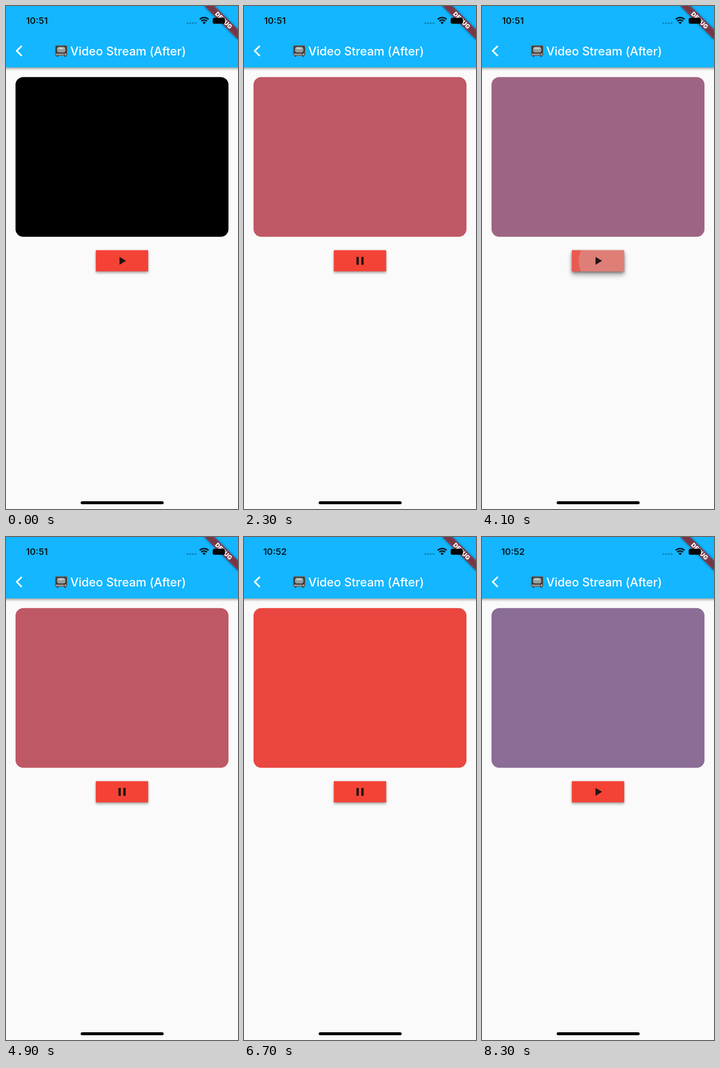
These frames come from a looping animation (390 px wide and 844 px high, 8.4 s). An HTML page:

```html
<!DOCTYPE html>
<html lang="en">
<head>
<meta charset="utf-8">
<title>Video Stream</title>
<style>
  html, body { margin: 0; width: 100%; height: 100%; overflow: hidden; background: #fafafa; }
  svg { display: block; width: 390px; height: 844px; font-family: Inter, Roboto, sans-serif; }
</style>
</head>
<body>
<svg viewBox="0 0 390 844">
  <defs>
    <filter id="soft" x="-20%" y="-50%" width="140%" height="200%"><feGaussianBlur stdDeviation="2"/></filter>
    <filter id="lifted" x="-20%" y="-50%" width="140%" height="200%"><feGaussianBlur stdDeviation="4"/></filter>
    <clipPath id="face"><rect x="151" y="409.5" width="88" height="36"/></clipPath>
  </defs>
  <rect width="390" height="844" fill="#fafafa"/>

  <!-- app bar -->
  <rect x="-8" y="0" width="406" height="105" opacity=".4" filter="url(#soft)"/>
  <rect width="390" height="103" fill="#13b6ff"/>
  <path d="M26.5 67 18 75.3l8.5 8.4" fill="none" stroke="#fff" stroke-width="2.7"/>
  <g id="tv">
    <rect x="82.5" y="66" width="20.5" height="17.5" rx="2" fill="#625c59"/>
    <rect x="84" y="67.5" width="17.5" height="11.5" rx="2.5" fill="#292a2b"/>
    <rect x="85.5" y="68.5" width="14.5" height="9.5" rx="3.5" fill="#939e9e"/>
    <path d="M87 70.5q5-2 11 0l-2 2h-7z" fill="#c3cccb"/>
    <path d="M84 81.3h13" stroke="#b8aaa0" stroke-width="1.6"/>
    <circle cx="100" cy="81.3" r="1" fill="#ddd"/>
    <path d="M85 84.3h3m10 0h3" stroke="#463f3c" stroke-width="1.8"/>
  </g>
  <text x="108" y="82.7" font-size="20" font-weight="500" letter-spacing="-.08" fill="#fff">Video Stream (After)</text>

  <!-- debug ribbon -->
  <g transform="translate(390 0) rotate(45)">
    <rect x="-40" y="28" width="80" height="12" opacity=".45" filter="url(#soft)"/>
    <rect x="-40" y="28" width="80" height="12" fill="#b71c1c" opacity=".63"/>
    <text y="37.7" font-size="10.2" font-weight="900" text-anchor="middle" fill="#fff">DEBUG</text>
  </g>

  <!-- status bar -->
  <text id="clock" x="52" y="30.3" font-size="15" font-weight="600" text-anchor="middle" fill="#07151c">10:51</text>
  <path d="M303.5 28.7h17" stroke="#0b85bd" stroke-width="2.6" stroke-dasharray="3 1.6"/>
  <g fill="none" stroke="#07151c" stroke-width="2.3">
    <path d="M325.6 22.4a10.6 10.6 0 0 1 15 0"/>
    <path d="M328.3 25.4a6.8 6.8 0 0 1 9.6 0"/>
  </g>
  <path d="M330.3 27.7a4 4 0 0 1 5.6 0l-2.8 2.9z" fill="#07151c"/>
  <rect x="347.5" y="19.8" width="20.5" height="10" rx="2.5" fill="#050505"/>

  <!-- player -->
  <rect id="video" x="16" y="119.3" width="358" height="268" rx="13"/>

  <!-- button -->
  <rect id="rest" x="151" y="411.5" width="88" height="36" opacity=".38" filter="url(#soft)"/>
  <rect id="raised" x="151" y="415.5" width="88" height="36" filter="url(#lifted)"/>
  <g clip-path="url(#face)">
    <rect x="151" y="409.5" width="88" height="36" fill="#f44336"/>
    <rect id="glow" x="151" y="409.5" width="88" height="36" fill="#bcbcbc"/>
    <circle id="splash" cx="204.5" cy="428" fill="#c8c8c8"/>
  </g>
  <path id="icon" fill="#201512"/>

  <rect x="125.5" y="831" width="139.5" height="5" rx="2.5"/>
</svg>
<script>
const LOOP = 8400;
const CYCLE = 2350;   // the stream starts over after this
const FULL = 2800;    // time from pure red to pure blue
const RED = [244, 67, 54], BLUE = [33, 150, 243];
const PLAY = 'M190.8 421v13.2l11-6.6z';
const PAUSE = 'M189 421h4v13.2h-4zM197.2 421h4v13.2h-4z';
const presses = [[920, 1500], [2650, 2680], [4000, 4060], [7800, 7860]];
const runs = [[1600, 2735], [4200, 7950]];

const el = id => document.getElementById(id);
const set = (id, name, value) => el(id).setAttribute(name, value);
const clamp = x => Math.max(0, Math.min(1, x));

function videoColour(t) {
  const run = runs.filter(r => t >= r[0]).pop();
  if (!run) return '#000';
  const k = (Math.min(t, run[1]) - run[0]) % CYCLE / FULL;
  return `rgb(${RED.map((c, i) => Math.round(c + (BLUE[i] - c) * k))})`;
}

function drawPress(t) {
  const [down, up] = presses.filter(p => t >= p[0]).pop() || [-2000, -1900];
  const held = Math.min(t, up) - down;
  const after = Math.max(0, t - up);
  const fade = clamp(1 - after / 200);
  set('splash', 'r', Math.min(55, held * .053 + after * .95));
  set('splash', 'opacity', .4 * fade);
  set('glow', 'opacity', .4 * fade * clamp(held / 100));
  set('raised', 'opacity', .36 * fade * clamp(held / 60));
}

function draw(t) {
  const playing = runs.some(([start, end]) => t >= start && t < end);
  set('video', 'fill', videoColour(t));
  set('icon', 'd', playing ? PAUSE : PLAY);
  el('clock').textContent = t < 5300 ? '10:51' : '10:52';
  drawPress(t);
}

const begin = performance.now();
function tick() {
  draw((performance.now() - begin) % LOOP);
  requestAnimationFrame(tick);
}
tick();
</script>
</body>
</html>
```
